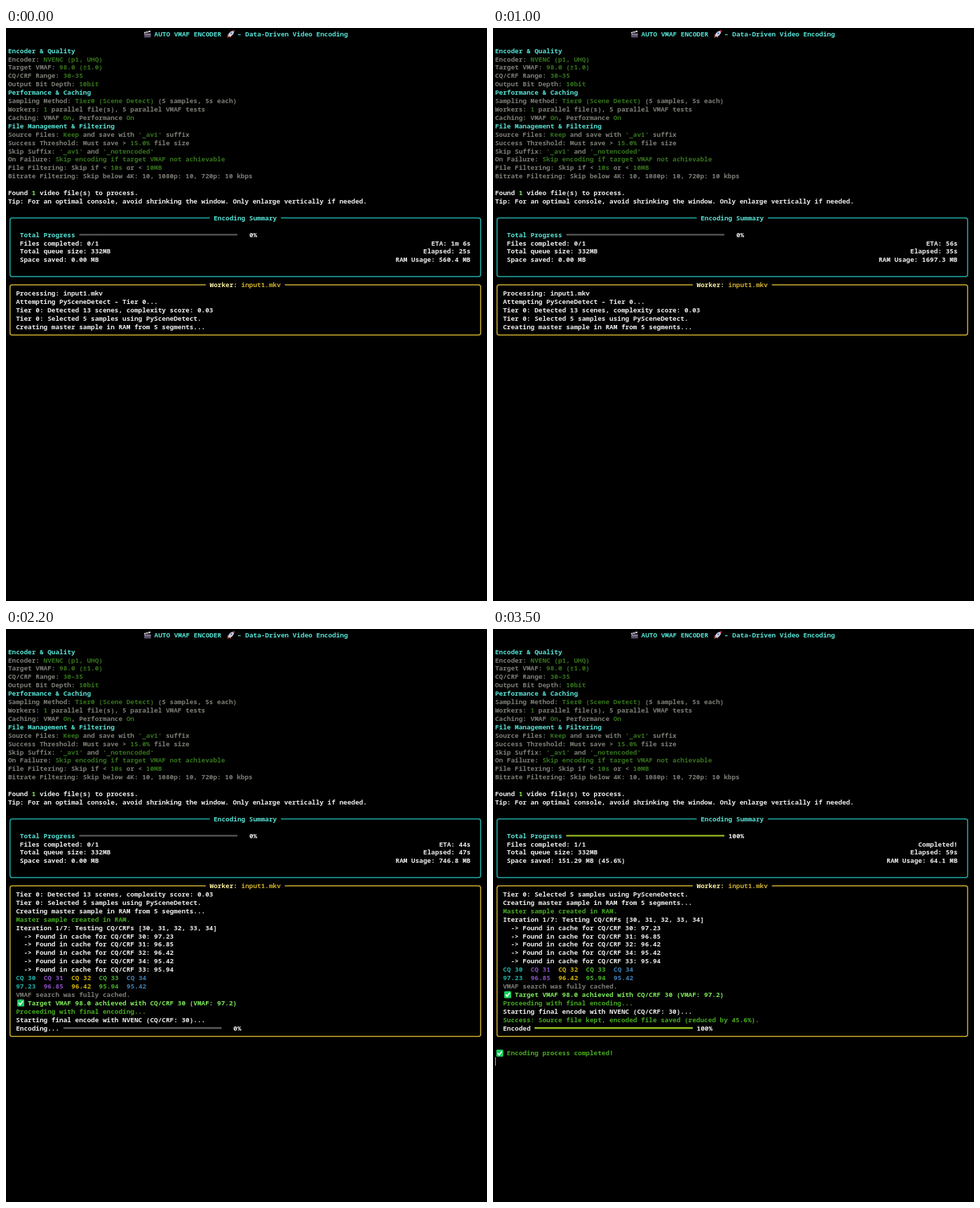
These frames come from a looping animation (686x816 px, 3.8 s). An HTML page:

```html
<!DOCTYPE html>
<html lang="en">
<head>
<meta charset="utf-8">
<title>Encoder console</title>
<style>
html, body { margin: 0; width: 686px; height: 816px; overflow: hidden; background: #000; }
svg { display: block; }
text { font: 600 9.4px "Noto Sans Mono", "DejaVu Sans Mono", monospace; white-space: pre; }
</style>
</head>
<body>
<svg id="screen" width="686" height="816" viewBox="0 0 686 816"></svg>
<script>
const CELL = 5.64, ROW = 11.91, LOOP = 3800, STEP = 100;
const ENCODE_AT = 22, DONE_AT = 35;
const WHITE = '#ececea', DIM = '#7c7c76', DIM_GREEN = '#34721c', GREEN = '#44a81e', LIME = '#7ce858';
const CYAN = '#56e2d4', TEAL = '#20aca8', YELLOW = '#c8aa2c', PALE = '#f4eca0', PINK = '#f0207c';
const TRACK = '#585858', FULL = '#94bc20';

const colX = col => 2.9 + col * CELL;
const rowY = row => 8.5 + row * ROW;

// A tilde in the string switches between the main and the accent colour.
function text(row, col, str, color = WHITE, accent = color) {
  const runs = str.replace(/&/g, '&amp;').replace(/</g, '&lt;').split('~')
    .map((run, i) => `<tspan fill="${i % 2 ? accent : color}">${run}</tspan>`).join('');
  return `<text x="${colX(col)}" y="${rowY(row) + 3.3}">${runs}</text>`;
}

const rightText = (row, str) => text(row, 117 - str.length, str);

function box(top, bottom, titleCol, titleEnd, color) {
  const l = colX(.5), r = colX(119.5), t = rowY(top), b = rowY(bottom), c = 3;
  return `<path fill="none" stroke="${color}" stroke-width="1.5" d="M${colX(titleCol - 1)} ${t}H${l + c}
    Q${l} ${t} ${l} ${t + c}V${b - c}Q${l} ${b} ${l + c} ${b}H${r - c}Q${r} ${b} ${r} ${b - c}
    V${t + c}Q${r} ${t} ${r - c} ${t}H${colX(titleEnd + 1)}"/>`;
}

function bar(row, col, percent) {
  const line = (from, to, color) => to > from
    ? `<path stroke="${color}" stroke-width="2.4" d="M${colX(col + from)} ${rowY(row)}H${colX(col + to)}"/>` : '';
  const filled = Math.floor(percent * .8) / 2;
  return line(filled ? filled + .5 : 0, 40, TRACK)
    + line(0, filled, percent < 100 ? PINK : FULL)
    + text(row, col + 41, `${percent}%`.padStart(4));
}

const at = (row, col, shape) => `<g transform="translate(${colX(col)} ${rowY(row)})">${shape}</g>`;

const check = (row, col) => at(row, col, `<rect x="1.8" y="-5" width="10" height="10" rx="1.5" fill="#18d060"/>
  <path d="M4 0l2 2.4L9.8-2.6" fill="none" stroke="#fff" stroke-width="1.6"/>`);

const clapper = at(0, 34, `<path d="M2.5-1H12V5H2.5z" fill="#5c5068"/>
  <path d="M2-2.6L11-5l.6 2L2.6-.8z" fill="#ddd"/>
  <path d="M4-3.2l1.6 1.6M7-4l1.6 1.6" stroke="#444" stroke-width="1.2"/>
  <path d="M2.5 1H12M5-1L4 1M8-1L7 1M11-1l-1 2" stroke="#a898b8" stroke-width=".7"/>`);

const rocket = at(0, 55, `<path d="M4 0L1.6 2.6 4.5 2zM8 3L7.2 6 5.5 3z" fill="#e03860"/>
  <path d="M3.6 2.2Q5-4 12.5-5 12 2 6 4z" fill="#d4d0e0"/>
  <path d="M9.5-4.4L12.5-5 12-2z" fill="#e03860"/>
  <circle cx="8.2" cy="-1" r="1.2" fill="#3878b8"/>
  <path d="M4 2.5L1.8 5 5.5 4z" fill="#f0a030"/>`);

const settings = [
  'Encoder & Quality',
  'Encoder: ~NVENC (p1, UHQ)',
  'Target VMAF: ~98.0 (±1.0)',
  'CQ/CRF Range: ~30–35',
  'Output Bit Depth: ~10bit',
  'Performance & Caching',
  'Sampling Method: ~Tier0 (Scene Detect)~ (5 samples, 5s each)',
  'Workers: ~1~ parallel file(s), 5 parallel VMAF tests',
  'Caching: VMAF ~On~, Performance ~On',
  'File Management & Filtering',
  "Source Files: ~Keep~ and save with ~'_av1'~ suffix",
  'Success Threshold: Must save > ~15.0%~ file size',
  "Skip Suffix: ~'_av1'~ and ~'_notencoded'",
  'On Failure: ~Skip encoding if target VMAF not achievable',
  'File Filtering: Skip if < ~10s~ or < ~10MB',
  'Bitrate Filtering: Skip below 4K: 10, 1080p: 10, 720p: 10 kbps'
];

const header = clapper + rocket
  + text(0, 37, 'AUTO VMAF ENCODER', CYAN)
  + text(0, 58, '– Data-Driven Video Encoding', CYAN)
  + settings.map((s, i) => s.includes(' & ')
    ? text(i + 2, 0, s, CYAN)
    : text(i + 2, 0, s, DIM, DIM_GREEN)).join('')
  + text(19, 0, 'Found ~1~ video file(s) to process.', WHITE, LIME)
  + text(20, 0, 'Tip: For an optimal console, avoid shrinking the window. Only enlarge vertically if needed.')
  + box(22, 29, 52, 68, TEAL)
  + text(22, 52, 'Encoding Summary', CYAN)
  + text(24, 3, 'Total Progress', CYAN)
  + text(26, 3, 'Total queue size: 332MB')
  + text(30, 51, 'Worker: ~input1.mkv', PALE, YELLOW);

const found = [[30, '97.23'], [31, '96.85'], [32, '96.42'], [34, '95.42'], [33, '95.94']];
const sorted = [...found].sort((a, b) => a[0] - b[0]);
const hues = ['#20b0a8', '#8850c0', '#d4b400', '#44b028', '#4080b4'];
const table = (row, cell) => sorted.map((f, i) => text(row, 2 + i * 7, cell(f), hues[i])).join('');

// Each log entry is a function of its row.
const say = (str, color) => row => text(row, 2, str, color);
const log = [
  say('Processing: input1.mkv'),
  say('Attempting PySceneDetect – Tier 0...'),
  say('Tier 0: Detected 13 scenes, complexity score: 0.03'),
  say('Tier 0: Selected 5 samples using PySceneDetect.'),
  say('Creating master sample in RAM from 5 segments...'),
  say('Master sample created in RAM.', GREEN),
  say('Iteration 1/7: Testing CQ/CRFs [30, 31, 32, 33, 34]'),
  ...found.map(([cq, score]) => say(`  -> Found in cache for CQ/CRF ${cq}: ${score}`)),
  row => table(row, f => 'CQ ' + f[0]),
  row => table(row, f => f[1]),
  say('VMAF search was fully cached.', DIM),
  row => check(row, 2) + text(row, 5, 'Target VMAF 98.0 achieved with CQ/CRF 30 (VMAF: 97.2)', LIME),
  say('Proceeding with final encoding...', GREEN),
  say('Starting final encode with NVENC (CQ/CRF: 30)...'),
  say('Success: Source file kept, encoded file saved (reduced by 45.6%).', GREEN)
];

const ramKeys = [[0, 560.4], [6, 1305.7], [14, 2088.8], [20, 2611.5], [21, 2698.4], [22, 746.8], [27, 752.1], [35, 760]];
function ram(tick) {
  const i = ramKeys.findIndex(k => k[0] > tick);
  const [t0, v0] = ramKeys[i - 1], [t1, v1] = ramKeys[i];
  return v0 + (v1 - v0) * (tick - t0) / (t1 - t0);
}

function summary(tick, done) {
  const left = 66 - tick;
  const eta = left >= 60 ? `1m ${left - 60}s` : `${left}s`;
  return bar(24, 18, done ? 100 : 0)
    + text(25, 3, `Files completed: ${done ? 1 : 0}/1`)
    + text(27, 3, 'Space saved: ' + (done ? '151.29 MB (45.6%)' : '0.00 MB'))
    + rightText(25, done ? 'Completed!' : 'ETA: ' + eta)
    + rightText(26, `Elapsed: ${Math.min(59, 25 + tick)}s`)
    + rightText(27, `RAM Usage: ${done ? '64.1' : ram(tick).toFixed(1)} MB`);
}

function worker(tick, done) {
  const encoding = tick >= ENCODE_AT;
  const lines = done ? log.slice(-16) : encoding ? log.slice(2, 18) : log.slice(0, 5);
  let out = box(30, encoding ? 48 : 36, 51, 69, YELLOW) + lines.map((line, i) => line(31 + i)).join('');
  if (done) {
    out += text(47, 2, 'Encoded') + bar(47, 10, 100)
      + check(50, 0) + text(50, 3, 'Encoding process completed!', GREEN)
      + `<rect x="3" y="${rowY(51) - 6}" width="1" height="12" fill="#aaa"/>`;
  } else if (encoding) {
    out += text(47, 2, 'Encoding...') + bar(47, 14, Math.round((tick - ENCODE_AT) * 7.8));
  }
  return out;
}

const screenEl = document.getElementById('screen');
let shown = -1;
function draw() {
  const tick = Math.min(DONE_AT, Math.floor(performance.now() % LOOP / STEP));
  if (tick !== shown) {
    const done = tick === DONE_AT;
    screenEl.innerHTML = header + summary(tick, done) + worker(tick, done);
    shown = tick;
  }
  requestAnimationFrame(draw);
}
draw();
</script>
</body>
</html>
```
